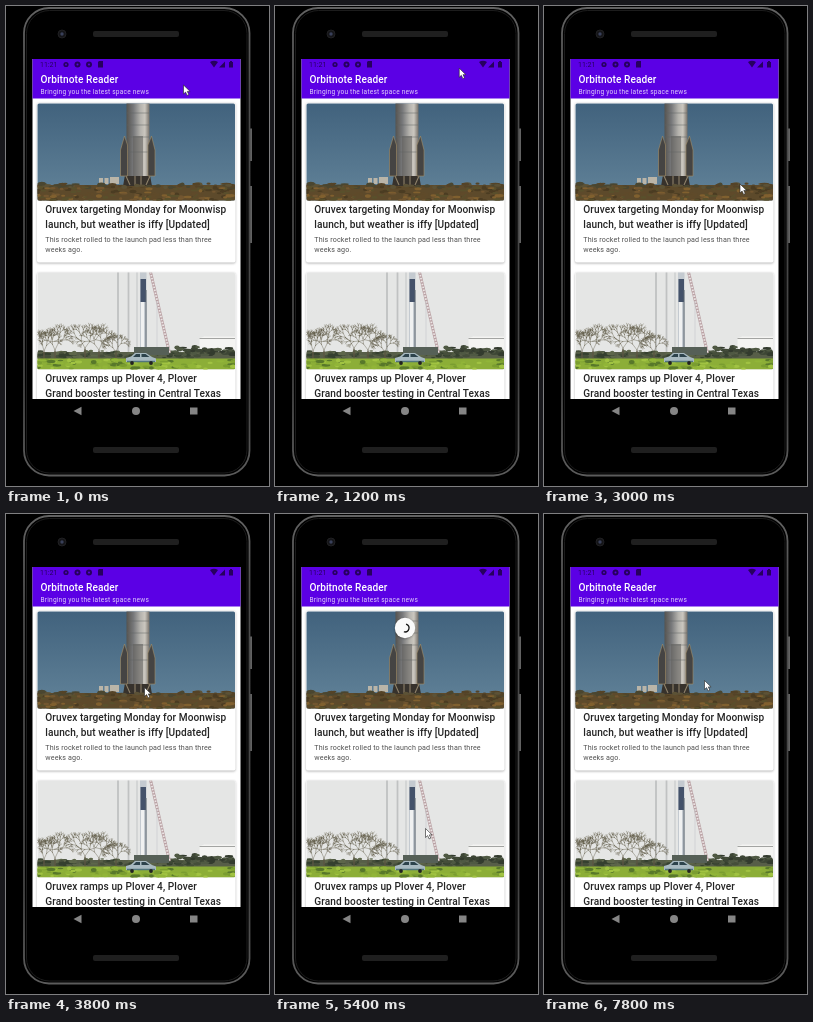
An HTML page that plays this animation: 263x480 px, repeating every 8 s.

```html
<!DOCTYPE html>
<html lang="en">
<head>
<meta charset="utf-8">
<title>News reader</title>
<style>
  html, body { margin: 0; width: 100%; height: 100%; overflow: hidden; background: #000; }
  svg { display: block; width: 263px; height: 480px; font-family: Roboto, "Open Sans", sans-serif; }
  .title { font-size: 10.1px; font-weight: 500; letter-spacing: .076px; fill: #252525; }
  .body { font-size: 7.14px; letter-spacing: .135px; fill: #505050; }
  .bar { fill: #fff; }
</style>
</head>
<body>
<svg viewBox="0 0 263 480">
  <defs>
    <linearGradient id="rim" x1="0" y1="0" x2="0" y2="1">
      <stop offset="0" stop-color="#626262"/><stop offset=".2" stop-color="#4c4c4c"/>
      <stop offset=".8" stop-color="#444"/><stop offset="1" stop-color="#5c5c5c"/>
    </linearGradient>
    <linearGradient id="sky" x1="0" y1="0" x2="0" y2="1">
      <stop offset="0" stop-color="#41627d"/><stop offset="1" stop-color="#628399"/>
    </linearGradient>
    <linearGradient id="steel">
      <stop offset="0" stop-color="#55534f"/><stop offset=".3" stop-color="#77787a"/>
      <stop offset=".6" stop-color="#b4b2ad"/><stop offset=".8" stop-color="#cbc7bf"/>
      <stop offset="1" stop-color="#77716a"/>
    </linearGradient>
    <filter id="soft" x="-10%" y="-10%" width="120%" height="120%"><feGaussianBlur stdDeviation=".8"/></filter>
    <clipPath id="screen"><rect x="26.500" y="53" width="208" height="340"/></clipPath>
    <clipPath id="photoA"><rect x="31.5" y="97.5" width="197.5" height="97" rx="1.5"/></clipPath>
    <clipPath id="photoB"><rect x="31.5" y="266.5" width="197.5" height="97" rx="1.5"/></clipPath>
  </defs>

  <!-- Phone -->
  <rect width="263" height="480"/>
  <path d="M243.500 122.500h2.500v32.500h-2.500zM243.500 180h2.500v57h-2.500z" fill="#626262"/>
  <rect x="18" y="2" width="225.500" height="467.500" rx="25" stroke="url(#rim)" stroke-width="1.8"/>
  <rect x="20.500" y="4.500" width="220.500" height="462.500" rx="23" fill="none" stroke="#1c1c1c"/>
  <rect x="87" y="25" width="86" height="6" rx="2" fill="#1f1f1f"/>
  <rect x="87" y="441" width="86" height="6" rx="2" fill="#1f1f1f"/>
  <circle cx="56" cy="28" r="4" fill="#141417" stroke="#252528" stroke-width=".8"/>
  <circle cx="56" cy="28" r="1.700" fill="#39405a"/>
  <path d="M67.500 405l8-4.300v8.600z" fill="#858585"/>
  <circle cx="130" cy="405" r="4" fill="#858585"/>
  <rect x="184" y="401.500" width="7.500" height="7" fill="#858585"/>

  <!-- Screen -->
  <g clip-path="url(#screen)">
    <rect x="26" y="53" width="209" height="340" fill="#fff"/>
    <rect x="31" y="97.500" width="198.5" height="160" rx="2" fill="#b5b5b5" filter="url(#soft)"/>
    <rect x="31" y="97" width="198.5" height="159.500" rx="2" fill="#fff"/>
    <rect x="31" y="267" width="198.5" height="160" rx="2" fill="#b5b5b5" filter="url(#soft)"/>
    <rect x="31" y="266.5" width="198.5" height="160" rx="2" fill="#fff"/>

    <g clip-path="url(#photoA)">
      <rect x="31" y="97" width="199" height="98" fill="url(#sky)"/>
      <rect x="31" y="179" width="199" height="16" fill="#5d4a2b"/>
      <path d="M93 172h4v6h-4zM98.500 172h4v6h-4zM104 171h9v7h-9z" fill="#bab5a8"/>
      <path d="M119 169h25l2 11h-29z" fill="#37322c"/>
      <path d="M120.500 97h23v73h-23z" fill="url(#steel)"/>
      <path d="M127 130h10v40h-10z" fill="#625f5b" opacity=".55"/>
      <path d="M121 107h22M121 119h22M121 131h22M121 146h22" stroke="#5f6061" stroke-width=".5"/>
      <path d="M118.500 130l3 9v31h-7v-26zM145.500 130l3.500 14v26h-7v-31z" fill="#454443" stroke="#a38d67" stroke-width=".6"/>
      <path d="M120 170l4 9M144 170l-4 9M129 170v9M135 170v9" stroke="#8d8069" stroke-width="1.1"/>
      <g id="brush"></g>
    </g>

    <g clip-path="url(#photoB)">
      <rect x="31" y="266" width="199" height="98" fill="#e5e6e5"/>
      <path d="M112 266v82M122.500 266v82" stroke="#c0c2c2" stroke-width="1.8"/>
      <path d="M131 266v82" stroke="#b9bcbe" stroke-width=".8"/>
      <path d="M193.500 332l5-1.500h31v13h-36z" fill="#f4f4f2"/>
      <path d="M193.500 332.500h36" stroke="#a3a4a2" stroke-width="1"/>
      <rect x="31" y="346" width="199" height="7" fill="#575e48"/>
      <g id="hedge"></g>
      <g id="trees" fill="none" stroke="#5c5744" stroke-linecap="round"></g>
      <rect x="31" y="352.500" width="199" height="11" fill="#8cae37"/>
      <g id="grass"></g>
      <path d="M134 266h6.500v83h-6.500z" fill="#c4cad0"/>
      <path d="M134.500 273h5.500v23h-5.500z" fill="#44526a"/>
      <path d="M135 296h3v50h-3z" fill="#f0f1f1"/>
      <path d="M140 284v64" stroke="#59636d" stroke-width="1"/>
      <path d="M144.500 266l19 81" stroke="#b9a1a4" stroke-width="3"/>
      <path d="M144.500 266l19 81" stroke="#ece5e5" stroke-width="1.8" stroke-dasharray="1.600 1.400"/>
      <path d="M151 295v50" stroke="#c5c8c9" stroke-width=".6"/>
      <path d="M128 341h35v8h-35z" fill="#566057"/>
      <path d="M120 356v-4l5-1.500 4-3.500h11l6 4 4 1.500v3.500z" fill="#a9bac1"/>
      <path d="M127 351l3-3h4v3zM135.500 348h4l4 3h-8z" fill="#2d434c"/>
      <path d="M121 355.500h28" stroke="#52767d" stroke-width="1.5"/>
      <circle cx="126" cy="357" r="1.900" fill="#222"/><circle cx="145" cy="357" r="1.900" fill="#222"/>
    </g>

    <g class="title">
      <text x="39.300" y="207">Oruvex targeting Monday for Moonwisp</text>
      <text x="39.300" y="222">launch, but weather is iffy [Updated]</text>
      <text x="39.300" y="376">Oruvex ramps up Plover 4, Plover</text>
      <text x="39.300" y="391">Grand booster testing in Central Texas</text>
    </g>
    <g class="body">
      <text x="39.300" y="235.500">This rocket rolled to the launch pad less than three</text>
      <text x="39.300" y="245.500">weeks ago.</text>
    </g>

    <g id="spinner">
      <circle cy=".8" r="10.3" fill="#000" opacity=".3" filter="url(#soft)"/>
      <circle r="10.2" fill="#fafafa"/>
      <path id="arc" fill="none" stroke="#151515" stroke-width="1.3" stroke-linecap="square"/>
    </g>

    <rect x="26" y="53" width="209" height="39.500" fill="#5b00e5"/>
    <g fill="#27005f">
      <text x="34" y="61.300" font-size="7">11:21</text>
      <circle cx="60" cy="58.500" r="2.600"/><circle cx="71.500" cy="58.500" r="3"/>
      <circle cx="83" cy="58.500" r="3"/><path d="M92 56l1-1h4v6.500h-5z"/>
      <path d="M204 56q4-2.500 8 0l-4 5.500zM219 55.500v6h-6zM223 56h1v-1h2v1h1v5.500h-4z"/>
      <g fill="#5b00e5"><circle cx="60" cy="58.500" r=".9"/><circle cx="71.500" cy="58.500" r="1"/><circle cx="83" cy="58.500" r="1"/></g>
    </g>
    <g class="bar">
      <text x="34.500" y="77.300" font-size="10.1" font-weight="500" letter-spacing=".076">Orbitnote Reader</text>
      <text x="34.500" y="88" font-size="6.6" letter-spacing=".2" opacity=".8">Bringing you the latest space news</text>
    </g>
  </g>

  <path id="cursor" d="M0 0v9l2.100-1.900 1.500 3.300 1.700-.8-1.500-3.200h2.800z" fill="#fff" stroke="#222" stroke-width=".6"/>
</svg>

<script>
const LOOP = 8000, STEP = 200, CYCLE = 1332;
const $ = id => document.getElementById(id);

// Columns: time, x, y of the pointer tip
const pointer = [
  [0, 177.5, 79], [200, 179, 77], [600, 183.5, 70.5], [1000, 183.5, 70.5],
  [1400, 185, 54], [2000, 186.5, 33.5], [2200, 202, 48], [2400, 236, 88],
  [2600, 251, 132], [2800, 231, 165], [3000, 196, 178], [3200, 164, 178],
  [3400, 146, 175], [3800, 138.5, 173.5], [4000, 139, 182], [4600, 149, 292],
  [4800, 150.5, 314.5], [6800, 150.5, 314.5], [7000, 154, 280],
  [7400, 160, 185], [7600, 160.5, 166.5], [8000, 160.5, 166.5]
];
const pop = [[0, 0], [4000, 0], [4400, 1], [6800, 1], [7200, 0], [8000, 0]];

function at(track, t) {
  const i = Math.max(1, track.findIndex(k => k[0] > t));
  const a = track[i - 1], b = track[i], u = (t - a[0]) / (b[0] - a[0]);
  return a.slice(1).map((v, j) => v + (b[j + 1] - v) * u);
}

// cubic-bezier(.4, 0, .2, 1)
function ease(x) {
  if (x <= 0) return 0;
  if (x >= 1) return 1;
  let lo = 0, hi = 1, s;
  for (let i = 0; i < 20; i++) {
    s = (lo + hi) / 2;
    const bx = 1.2 * s * (1 - s) ** 2 + .6 * s * s * (1 - s) + s ** 3;
    if (bx < x) lo = s; else hi = s;
  }
  return s * s * (3 - 2 * s);
}

function arcPath(start, sweep, r) {
  const point = deg => {
    const a = deg * Math.PI / 180;
    return (r * Math.cos(a)).toFixed(2) + " " + (r * Math.sin(a)).toFixed(2);
  };
  return `M${point(start)}A${r} ${r} 0 ${sweep > 180 ? 1 : 0} 1 ${point(start + sweep)}`;
}

function spin(t) {
  const turns = Math.floor((t - 5150) / CYCLE);
  const p = (t - 5150) / CYCLE - turns;
  const head = 290 * ease(2 * p), tail = 290 * ease(2 * p - 1);
  return arcPath(-119 + turns * 576 + 286 * p + tail, Math.max(6, head - tail), 4);
}

function random(seed) {
  return () => (seed = (seed * 16807) % 2147483647) / 2147483647;
}

function add(parent, tag, attrs) {
  const el = document.createElementNS("http://www.w3.org/2000/svg", tag);
  for (const k in attrs) el.setAttribute(k, attrs[k]);
  parent.append(el);
}

// Fills a strip with small seeded blobs
function scatter(id, seed, count, [x, y, w, h], size, tones) {
  const rnd = random(seed);
  for (let i = 0; i < count; i++) {
    add($(id), "ellipse", {
      cx: x + rnd() * w, cy: y + rnd() * h,
      rx: size * (.6 + rnd()), ry: size * (.25 + rnd() * .45),
      fill: tones[Math.floor(rnd() * tones.length)]
    });
  }
}

function plantTrees() {
  const rnd = random(73);
  const trunks = [[38, 8], [49, 9], [79, 11], [93, 9], [110, 7]];
  let d = "";
  const grow = (x, y, angle, size, depth) => {
    const nx = x + Math.cos(angle) * size, ny = y + Math.sin(angle) * size;
    d += `M${x.toFixed(1)} ${y.toFixed(1)}L${nx.toFixed(1)} ${ny.toFixed(1)}`;
    if (!depth) return;
    for (const side of [-1, 1])
      grow(nx, ny, angle + side * (.25 + rnd() * .4), size * (.68 + rnd() * .18), depth - 1);
  };
  for (const [x, size] of trunks) {
    grow(x, 353, -1.57, size, 6);
    add($("trees"), "path", { d: `M${x} 354v${-size}`, "stroke-width": 1.2 });
  }
  add($("trees"), "path", { d, "stroke-width": .5, opacity: .8 });
}

function draw() {
  const t = Math.floor(performance.now() % LOOP / STEP) * STEP;
  const [x, y] = at(pointer, t), [scale] = at(pop, t);
  $("cursor").setAttribute("transform", `translate(${x} ${y})`);
  $("spinner").setAttribute("transform", `translate(130 114) scale(${scale})`);
  $("spinner").setAttribute("visibility", scale > 0 ? "visible" : "hidden");
  $("arc").setAttribute("d", spin(t));
  requestAnimationFrame(draw);
}

scatter("brush", 41, 60, [31, 177.5, 199, 4], 3, ["#4a4630", "#5c5236", "#544327"]);
scatter("brush", 17, 170, [31, 181, 199, 14], 2.5, ["#4b3c22", "#5f4a2a", "#725630", "#59502c", "#80602f"]);
scatter("hedge", 29, 90, [31, 345, 199, 7], 3, ["#454e3a", "#5e674b", "#35402f"]);
scatter("hedge", 53, 50, [165, 341, 65, 8], 3, ["#3d4635", "#4f5943", "#333b2e"]);
scatter("grass", 67, 90, [31, 354, 199, 9], 3, ["#a1c342", "#7a9d30", "#58782a", "#91b538"]);
plantTrees();
draw();
</script>
</body>
</html>
```
